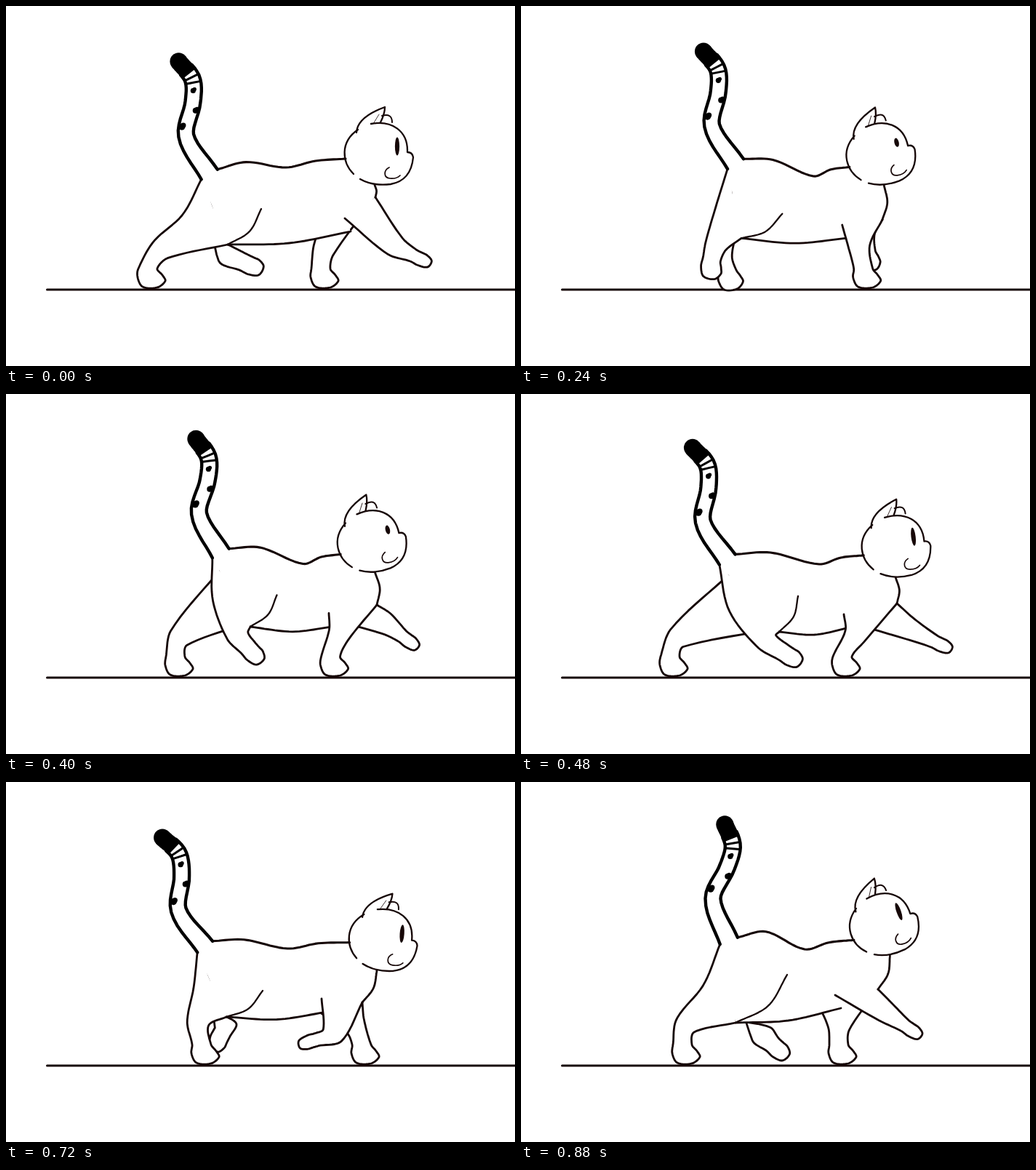
Recreate the animation shown at these times as an HTML page. Size 700 by 495 pixels, loop 0.96 s.

```html
<!DOCTYPE html>
<html lang="en">
<head>
<meta charset="utf-8">
<title>Walking cat</title>
<style>
  html, body { margin: 0; width: 100%; height: 100%; overflow: hidden; background: #fff; }
  svg { display: block; width: 700px; height: 495px; }
  path { stroke-linecap: round; stroke-linejoin: round; }
</style>
</head>
<body>
<svg viewBox="0 0 700 495">
  <path d="M56.5 390H702" stroke="#170808" stroke-width="3"/>
  <g id="cat"></g>
</svg>
<script>
const STEP = 80, COUNT = 12;
const INK = '#160707', BLACK = '#000';

// Key poses of the rig by step.
// Legs: knee, ankle, and 1 when the paw hangs free or 0 when it stands.
const keys = {
  0: {
    head: [515, 203], turn: 0, base: [280, 232], sway: 11, dip: [385, 222],
    thigh: [351, 279], groin: [305, 328], chest: [508, 263], elbow: [466, 292],
    hindN: [213, 335, 195, 361, 0], hindF: [305, 342, 328, 353, 1],
    foreN: [535, 330, 560, 343, 1], foreF: [437, 335, 433, 361, 0]
  },
  1: {
    head: [506, 219], turn: 0, base: [272, 231], sway: -7, dip: [392, 236],
    thigh: [350, 307], groin: [275, 332], chest: [485, 297], elbow: [437, 303],
    hindN: [206, 339, 179, 361, 0], hindF: [304, 357, 328, 371, 1],
    foreN: [480, 332, 510, 361, 0], foreF: [400, 345, 387, 361, 0]
  },
  4: {
    head: [492, 195], turn: -21, base: [307, 211], sway: 19, dip: [407, 233],
    thigh: [364, 275], groin: [317, 313], chest: [503, 292], elbow: [444, 300],
    hindN: [299, 325, 304, 342, 1], hindF: [261, 335, 261, 361, 0],
    foreN: [457, 328, 451, 361, 0], foreF: [510, 308, 522, 326, 1]
  },
  6: {
    head: [518, 209], turn: -7, base: [284, 228], sway: 9, dip: [410, 234],
    thigh: [381, 278], groin: [355, 327], chest: [517, 288], elbow: [444, 303],
    hindN: [338, 340, 362, 356, 1], hindF: [215, 335, 205, 361, 0],
    foreN: [459, 333, 442, 361, 0], foreF: [535, 323, 568, 340, 1]
  },
  7: {
    head: [527, 221], turn: 0, base: [286, 235], sway: 0, dip: [402, 235],
    thigh: [370, 285], groin: [346, 340], chest: [468, 326], elbow: [437, 295],
    hindN: [327, 343, 356, 361, 0], hindF: [198, 341, 174, 361, 0],
    foreN: [441, 330, 426, 360, 1], foreF: [515, 335, 544, 361, 0]
  },
  9: {
    head: [521, 217], turn: 4, base: [274, 227], sway: 5, dip: [387, 229],
    thigh: [353, 287], groin: [303, 323], chest: [490, 303], elbow: [434, 298],
    hindN: [264, 332, 269, 361, 0], hindF: [302, 335, 297, 345, 1],
    foreN: [449, 348, 428, 354, 1], foreF: [480, 335, 489, 361, 0]
  },
  11: {
    head: [501, 195], turn: -19, base: [286, 219], sway: 24, dip: [390, 230],
    thigh: [366, 265], groin: [295, 331], chest: [491, 285], elbow: [432, 293],
    hindN: [226, 335, 222, 361, 0], hindF: [330, 346, 346, 361, 1],
    foreN: [500, 315, 528, 335, 1], foreF: [437, 338, 437, 361, 0]
  }
};

const rad = a => a * Math.PI / 180;
const lerp = (a, b, k) => a + (b - a) * k;
const range = (n, f) => Array.from({ length: n + 1 }, (_, i) => f(i / n));
const add = ([x, y], dx, dy) => [x + dx, y + dy];
const mid = (p, q, k = .5) => [lerp(p[0], q[0], k), lerp(p[1], q[1], k)];
const dist = (p, q) => Math.hypot(q[0] - p[0], q[1] - p[1]);
const spin = ([x, y], a) => [x * Math.cos(a) - y * Math.sin(a), x * Math.sin(a) + y * Math.cos(a)];
// Point beside the line p-q, at k along it; positive is left of travel.
const beside = (p, q, off, k = .5) => {
  const len = dist(p, q) || 1;
  return add(mid(p, q, k), (q[1] - p[1]) / len * off, (p[0] - q[0]) / len * off);
};

// Point at index s (may be fractional) on a smooth curve through pts.
function at(pts, s) {
  const last = pts.length - 1;
  const i = Math.max(0, Math.min(last - 1, Math.floor(s))), t = s - i;
  const b = pts[i], c = pts[i + 1], a = pts[i - 1] || b, d = pts[i + 2] || c;
  const len = dist(b, c), ka = len / (dist(a, b) + len), kd = len / (len + dist(c, d));
  const t2 = t * t, t3 = t2 * t;
  return [0, 1].map(n =>
    (2 * t3 - 3 * t2 + 1) * b[n] + (t3 - 2 * t2 + t) * (c[n] - a[n]) * ka +
    (3 * t2 - 2 * t3) * c[n] + (t3 - t2) * (d[n] - b[n]) * kd);
}
const smooth = pts => range(pts.length * 8, u => at(pts, u * (pts.length - 1)));

const d = pts => 'M' + pts.map(p => p.map(v => v.toFixed(1)).join(' ')).join('L');
const path = (data, width = 2.8, fill = 'none', color = INK) =>
  `<path d="${data}" fill="${fill}" stroke="${color}" stroke-width="${width}"/>`;
const line = (pts, width, fill) => path(d(smooth(pts)), width, fill);

// Tail joints: every segment leans by its own share of the sway.
function tailJoints(base, sway) {
  const lean = [[62, -40, .8], [47, 0, 1], [32, -14, 1.2], [31, -52, 1.3]];
  const pts = [base];
  for (const [len, rest, share] of lean) {
    const a = rad(rest + share * sway);
    pts.push(add(pts.at(-1), len * Math.sin(a), -len * Math.cos(a)));
  }
  return pts;
}

function tailSide(pts, s, off) {
  const ends = [at(pts, Math.max(0, s - .02)), at(pts, Math.min(4, s + .02))];
  return beside(...ends, off);
}

function tail(pts) {
  const edge = (k, from, to) => range(24, u => {
    const s = lerp(from, to, u);
    return tailSide(pts, s, k * (10.5 + 2.5 * Math.max(0, 1 - s)));
  });
  const disc = ([x, y], r) => `<circle cx="${x}" cy="${y}" r="${r}"/>`;
  const spot = (s, off, r) => {
    const p = tailSide(pts, s, off);
    return disc(p, r) + disc(add(p, 2, -2), r - 1);
  };
  const stripe = s => path(d([-9, 0, 9].map(off => tailSide(pts, s, off))), 3, 'none', BLACK);
  return [-1, 1].map(k => path(d(edge(k, 0, 3.5)), 4.4, 'none', BLACK)).join('') +
    path(d([...edge(-1, 3.35, 4), ...edge(1, 4, 3.35)]) + 'Z', 3, BLACK, BLACK) +
    disc(pts[4], 12) + stripe(2.85) + stripe(3.1) +
    spot(2.5, 1, 3.6) + spot(1.8, -6, 4) + spot(1.27, 6, 4.6);
}

// Outline from the back of the hip round the paw to the front of the hip.
function leg([kx, ky, ax, ay, up], back, front, wide, rump) {
  const knee = [kx, ky], ankle = [ax, ay], hip = mid(back, front);
  const len = dist(hip, ankle), n = [(ay - hip[1]) / len, (hip[0] - ax) / len];
  const w = lerp(13, wide, up), turn = -up * Math.atan2(ax - kx, ay - ky);
  const paw = [
    [-w, 0], [-w - 1 + up, 12], [-w * .55, 25],
    [lerp(13, w * .55, up), 26], [lerp(24, w, up), 17],
    [lerp(20, w, up), 9], [w, 0]
  ].map(p => add(ankle, ...spin(p, turn)));
  const heel = add(knee, -n[0] * 15, -n[1] * 15);
  const haunch = rump ? [beside(back, heel, .14 * (back[0] - heel[0]) - 7 * up)] : [];
  return [back, ...haunch, heel, ...paw, add(knee, n[0] * 15, n[1] * 15), front];
}

function head([x, y], turn, open) {
  const eye = open
    ? `<ellipse cx="23" cy="-10" rx="3.1" ry="${12.5 * open}" fill="${INK}"/>`
    : path('M15 -4Q24 1 30 -5', 1.8);
  return `<g transform="translate(${x} ${y}) rotate(${turn})">` +
    path('M-31 -33C-56 -16 -53 12 -37 28', 2.3) +
    path('M-28 35Q-10 45 14 42Q42 37 45 5Q44 -2 37 -2C38 -32 15 -46 -13 -41', 2.3) +
    path('M-33 -29Q-32 -50 6 -64Q6 -55 0 -43', 2.3) +
    path('M2 -52Q16 -56 16 -43', 2) + path('M-10 -41L-2 -54', .8) +
    path('M12 19C4 23 4 33 13 34Q22 35 27 30', 1.7) + eye + '</g>';
}

function draw(p, open) {
  const onHead = (x, y) => add(p.head, ...spin([x, y], rad(p.turn)));
  const joints = tailJoints(p.base, p.sway);
  const [rear, front] = [13, -13].map(off => tailSide(joints, 0, off));
  const neck = onHead(-48, 7), throat = onHead(-8, 43);

  const hump = add(mid(front, p.dip, .42), 0, -4 - .45 * p.sway);
  const spine = [front, hump, p.dip, beside(p.dip, neck, 3), neck];
  const bellyEnd = add(p.elbow, 8, 18);
  const belly = [p.groin, add(mid(p.groin, bellyEnd), 0, 7), bellyEnd];
  const chest = [throat, beside(throat, p.chest, .12 * dist(throat, p.chest)), p.chest];
  const flank = [p.thigh, beside(p.thigh, p.groin, .14 * dist(p.thigh, p.groin)), p.groin];
  const torso = [rear, ...smooth(spine), ...smooth(chest), p.elbow, ...smooth(belly).reverse()];

  return line(leg(p.hindF, add(rear, 13, 14), add(p.groin, -8, -4), 12), 2.8, '#fff') +
    line(leg(p.foreF, add(p.elbow, -30, 0), p.chest, 9), 2.8, '#fff') +
    path(d(torso), 0, '#fff', 'none') + line(belly) +
    line(leg(p.hindN, rear, p.groin, 12, true), 2.8, '#fff') +
    line(leg(p.foreN, p.elbow, p.chest, 9), 2.8, '#fff') +
    line(flank, 2.3) + line(chest) + line(spine, 3.1) +
    tail(joints) + head(p.head, p.turn, open);
}

const blend = (a, b, k) => Array.isArray(a) ? a.map((v, i) => lerp(v, b[i], k)) : lerp(a, b, k);
const steps = Object.keys(keys).map(Number);

function pose(i) {
  const prev = steps.findLast(s => s <= i), next = steps.find(s => s >= i);
  const k = (i - prev) / (next - prev || 1);
  return Object.fromEntries(Object.entries(keys[prev])
    .map(([name, v]) => [name, blend(v, keys[next][name], k)]));
}

const blink = i => Math.min(1, Math.abs(i - 4) / 2);
const drawings = Array.from({ length: COUNT }, (_, i) => draw(pose(i), blink(i)));

const cat = document.getElementById('cat');
let shown = -1, start;
function render(ms) {
  const i = Math.floor(ms / STEP) % COUNT;
  if (i !== shown) cat.innerHTML = drawings[shown = i];
}
function tick(now) {
  start ??= now;
  render(Math.max(0, now - start));
  requestAnimationFrame(tick);
}
render(0);
requestAnimationFrame(tick);
</script>
</body>
</html>
```
